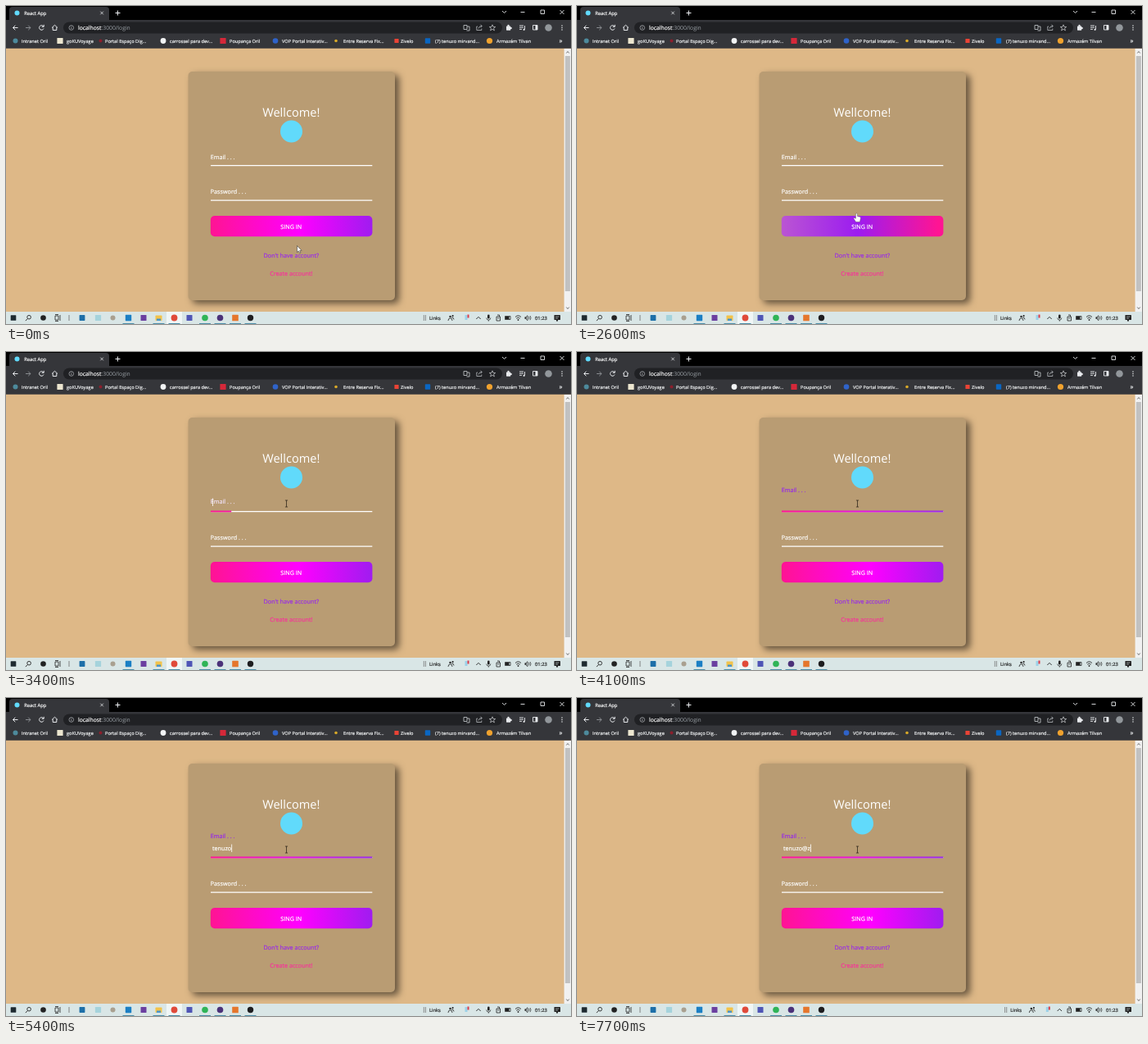
Recreate the animation shown at these times as an HTML page with a canvas. Size 690 px wide and 388 px high, loop 8 s.

```html
<!DOCTYPE html>
<html lang="en">
<head>
<meta charset="utf-8">
<title>Login</title>
<style>
  html, body { margin: 0; width: 100%; height: 100%; overflow: hidden; background: #deb887; }
  canvas, svg { position: absolute; left: 0; top: 0; width: 690px; height: 388px; }
  text {
    font-family: "Open Sans", "Noto Sans", sans-serif; font-size: 7.2px; white-space: pre;
    color: #fff; fill: currentColor; stroke: currentColor; stroke-width: .18px;
    text-rendering: geometricPrecision;
  }
  .mid text { text-anchor: middle; }
  .marks text { font-size: 5.65px; color: #f1f3f4; }
  .bar text { font-size: 5.8px; color: #1c1c1c; }
  .path { fill: #9aa0a6; stroke: none; }
</style>
</head>
<body>
<canvas id="stage" width="690" height="388"></canvas>
<svg viewBox="0 0 690 388">
  <text x="22.2" y="10.6" style="font-size:5.8px">React App</text>
  <text x="88" y="29" style="font-size:6.8px">localhost<tspan class="path">:3000/login</tspan></text>
  <g class="marks">
    <text x="19" y="44.6">Intranet Oril</text>
    <text x="74" y="44.6">goKUVoyage</text>
    <text x="121" y="44.6">Portal Espaço Dig...</text>
    <text x="200" y="44.6">carrossel para dev...</text>
    <text x="273" y="44.6">Poupança Oril</text>
    <text x="337" y="44.6">VOP Portal Interativ...</text>
    <text x="412" y="44.6">Entre Reserva Fix...</text>
    <text x="482" y="44.6">Zivelo</text>
    <text x="524" y="44.6">(7) tenuzo mirvand...</text>
    <text x="599" y="44.6">Armazém Tilvan</text>
    <text x="675.5" y="44.6" style="font-size:8px">»</text>
  </g>
  <g class="mid">
    <text x="348.3" y="135" style="font-size:14.6px;stroke:none">Wellcome!</text>
    <text x="348.3" y="271.6">SING IN</text>
    <text x="348.3" y="306.6" style="color:#9a2be8">Don't have account?</text>
    <text x="348.3" y="328.5" style="color:#f8329a">Create account!</text>
  </g>
  <text id="label" x="249.8" y="186.6">Email . . .</text>
  <text x="249.8" y="229.3">Password . . .</text>
  <text id="typed" x="252" y="186"></text>
  <rect id="caret" y="178.5" width=".8" height="9.5" fill="#fff"/>
  <g class="bar">
    <text id="links" y="382.6">Links</text>
    <text x="646" y="382.6">01:23</text>
  </g>
  <g id="cursor" stroke-linejoin="round">
    <path id="arrow" d="M0 0V8L1.9 6.3L3.2 9L4.4 8.5L3.2 5.8H5.6Z" fill="#fff" stroke="#222" stroke-width=".5"/>
    <path id="hand" d="M-1.6 -5Q-.6 -6 .4 -5V-2L3.6 -1.2Q4.6 -.8 4.4 .6L3.4 5H-1.4L-4.2 .8Q-3.8 -.7 -1.6 .8Z" fill="#fff" stroke="#444" stroke-width=".4"/>
    <path id="beam" d="M-1.6 -4H1.6M0 -4V4M-1.6 4H1.6" fill="none" stroke="#33291c" stroke-width=".8"/>
  </g>
</svg>
<script>
const LOOP = 8000, STEP = 100;
const $ = id => document.getElementById(id);
const ctx = $('stage').getContext('2d');

const KEYS = [[4600, 't'], [4700, 'e'], [4900, 'n'], [5100, 'u'], [5300, 'z'], [5400, 'o'], [6400, '@'], [7700, 'z']];
const FOCUS = 3340;
const PATH_X = [[2400, 355.5], [2500, 348], [2600, 342], [3100, 342.5]];
const PATH_Y = [[2400, 292.5], [2500, 275], [2600, 258.5], [2700, 243], [2800, 218], [2900, 199], [3000, 189], [3100, 185]];
const SHEEN = [[2400, 0], [2600, 1.5], [2650, 1.5], [3100, 0]];
const STRIP = [[0, '#ff1493'], [.55, '#ff00ff'], [1, '#a01cf0'], [1.5, '#ba55d3'], [1.97, '#9c1cf0'], [2.47, '#ff1493'], [2.5, '#ff1493']];

const mix = (a, b, k) => a + (b - a) * k;

function track(keys, t) {
  if (t <= keys[0][0]) return keys[0][1];
  for (let i = 1; i < keys.length; i++) {
    const [t0, a] = keys[i - 1], [t1, b] = keys[i];
    if (t <= t1) return mix(a, b, (t - t0) / (t1 - t0));
  }
  return keys[keys.length - 1][1];
}

// cubic-bezier(.25, .1, .25, 1)
function ease(x) {
  if (x <= 0) return 0;
  if (x >= 1) return 1;
  const curve = (p, q, s) => 3 * p * s * (1 - s) ** 2 + 3 * q * s * s * (1 - s) + s ** 3;
  let lo = 0, hi = 1;
  for (let i = 0; i < 24; i++) {
    const s = (lo + hi) / 2;
    if (curve(.25, .25, s) < x) lo = s; else hi = s;
  }
  return curve(.1, 1, lo);
}

function box(x, y, w, h, color, r = 0) {
  ctx.fillStyle = color;
  ctx.beginPath();
  ctx.roundRect(x, y, w, h, r);
  ctx.fill();
}

function dot(x, y, r, color) {
  ctx.fillStyle = color;
  ctx.beginPath();
  ctx.arc(x, y, r, 0, 7);
  ctx.fill();
}

const square = (x, y, r, color) => box(x - r, y - r, 2 * r, 2 * r, color, .6);

function line(d, color, width = 1) {
  ctx.strokeStyle = color;
  ctx.lineWidth = width;
  ctx.stroke(new Path2D(d));
}

function drawBrowser() {
  const ink = '#e8eaed';
  box(0, 0, 690, 18, '#000');
  box(4, 1, 122, 20, '#35363a', 4);
  box(0, 17, 690, 35, '#35363a');
  box(70, 19.5, 536, 14, '#202124', 7);
  dot(13.5, 8.5, 3, '#61dafb');
  line('M115.3 6.7l3.6 3.6m0-3.6l-3.6 3.6', ink, .8);
  line('M133.5 8.5h6m-3-3v6', ink, 1);
  line('M606 6l2.5 2.5l2.5-2.5M628.5 7.5h5M653 5h4.5v4.5h-4.5zM676.5 5l5 5m0-5l-5 5', ink, .9);

  line('M14.5 26.5h-6m2.8-2.8l-2.8 2.8l2.8 2.8', ink, 1);
  line('M24 26.5h6m-2.8-2.8l2.8 2.8l-2.8 2.8', '#898c90', 1);
  line('M45.8 25a2.8 2.8 0 1 0 .2 2.5M46.2 22.8v2.5h-2.5', ink, 1);
  line('M56 26.5l3.5-3.2l3.5 3.2M57.2 26v3.5h4.6v-3.5', ink, 1);
  line('M77 26.5a2.8 2.8 0 1 0 5.6 0a2.8 2.8 0 1 0-5.6 0M79.8 26v2M79.8 24.6v.8', '#b8bbbf', .7);

  line('M559 23.5h4v5h-4zM563 25h3v5h-3.5', '#b8bbbf', .9);
  line('M576 25h-1.2v4.5h6v-2M577 27.5q.5-3 4-3m-1.5-1.8l1.8 1.8l-1.8 1.8', '#b8bbbf', .8);
  line('M594 22.8l1 2.6l2.7.1l-2.1 1.7l.8 2.7l-2.4-1.6l-2.4 1.6l.8-2.7l-2.1-1.7l2.7-.1z', '#d0d2d5', .7);
  box(611, 24.5, 5.2, 5.2, ink, .6);
  dot(613.5, 24, 1.2, ink);
  dot(616.6, 27, 1.2, ink);
  line('M627 24h5m-5 2.2h5m-5 2.2h3M633.5 24v4.5', ink, .9);
  dot(632.6, 28.8, 1.1, ink);
  line('M643.5 23.5h5.5v5.5h-5.5z', ink, .9);
  box(646.5, 23.5, 2.5, 5.5, ink);
  dot(662.5, 26.5, 4.3, '#92979b');
  [24, 26.5, 29].forEach(y => dot(679, y, .75, ink));

  square(66, 42.5, 3.6, '#ece6cf');
  square(265, 42.5, 3.6, '#d62839');
  square(477, 42.5, 2.6, '#ea4335');
  square(515, 42.5, 3.2, '#0a66c2');
  dot(11.5, 42.5, 3, '#4d8a9c');
  dot(115.5, 42.5, 2, '#8b1f2c');
  dot(192, 42.5, 3.4, '#f1f3f4');
  dot(329, 42.5, 3.3, '#2f63c9');
  dot(403, 42.5, 1.8, '#d8a928');
  dot(590.5, 42.5, 3.6, '#f0a22e');
}

function drawPage(t) {
  box(0, 51.7, 690, 321.3, '#deb887');
  box(681.6, 52, 8.4, 321, '#f1f1f1');
  box(682.9, 61, 6, 287, '#c1c1c1');
  line('M684.3 57.5l1.7-2l1.7 2M684.3 367.5l1.7 2l1.7-2', '#606060', .9);

  ctx.save();
  ctx.shadowColor = 'rgba(0,0,0,.55)';
  ctx.shadowBlur = 8;
  ctx.shadowOffsetX = 5;
  ctx.shadowOffsetY = 4;
  box(222.5, 80, 252.5, 279, '#b99c73', 5);
  ctx.restore();

  dot(348.5, 153, 13.5, '#61dafb');
  box(250, 193.9, 197.3, 1.3, '#fff');
  box(250, 236.4, 197.3, 1.3, '#fff');

  const under = ctx.createLinearGradient(250, 0, 447, 0);
  under.addColorStop(0, '#ff1493');
  under.addColorStop(.5, '#e414e0');
  under.addColorStop(1, '#9a2bea');
  box(250, 193.6, 197.3 * ease((t - FOCUS) / 500), 1.8, under);

  const left = 250 - 197 * track(SHEEN, t);
  const sheen = ctx.createLinearGradient(left, 0, left + 197 * 2.5, 0);
  STRIP.forEach(([at, color]) => sheen.addColorStop(at / 2.5, color));
  box(249.8, 256, 197.6, 25.2, sheen, 5);
}

function drawTaskbar(t) {
  const ink = '#222', y = 380.5, shift = t >= 5700 ? 12.3 : 0;
  box(0, 373, 690, 15, '#d9e6e6');
  box(196, 373, 19, 15, '#f0f6f6');
  square(9, y, 3.3, '#1e2a30');
  line('M25.8 379.7a2.3 2.3 0 1 0 4.6 0a2.3 2.3 0 1 0-4.6 0M26.4 381.5l-2.6 2.6', ink, .9);
  dot(45.5, y, 3.3, ink);
  line('M60 378h4v5h-4zM66 377v7M60 376.5h4M60 384.5h4', ink, .8);
  line('M77 377v7', '#777', .9);
  square(93, y, 3.4, '#1d6fa8');
  square(112.5, y, 3.6, '#a5d3dc');
  dot(130.5, y, 3, '#a9a090');
  square(149.5, y, 3.7, '#1b7fc4');
  square(168, y, 3.5, '#6b3fa0');
  box(182.5, 377.5, 8, 6.5, '#f2c34b', .8);
  box(184, 381.5, 5, 2.5, '#4a94c9');
  dot(205.5, y, 3.9, '#e04a3a');
  square(224, y, 3.5, '#4f55b5');
  dot(243, y, 3.8, '#2fb457');
  dot(261.5, y, 3.8, '#4b3279');
  square(280, y, 3.8, '#e5762c');
  dot(298.5, y, 3.7, '#1d1d1f');
  [149.5, 186.5, 205.5, 243, 261.5, 280, 298.5].forEach(x => box(x - 7, 387, 14, 1, '#4d8ea8'));

  ctx.save();
  ctx.translate(shift, 0);
  line('M510.3 377v7M512.4 377v7', '#777', .8);
  line('M540 384q0-3 2.5-3t2.5 3M544 380q2.8-.5 3 2.5', ink, .8);
  dot(542.5, 379, 1.2, ink);
  dot(545.6, 378, 1.1, ink);
  box(560.5, 377, 3, 6, '#9bd1e8');
  box(563.5, 376.5, 2, 4, '#d83b4b');
  line('M574.3 382l2.7-2.7l2.7 2.7', ink, .9);
  ctx.restore();

  if (!shift) {
    box(588, 376.5, 2.6, 5, ink, 1.3);
    line('M586.7 380.5q.2 2.6 2.6 2.6t2.6-2.6M589.3 383v1.7', ink, .7);
  }
  line('M599 379h4.5v5h-4.5zM600 377h2.5v2M600.3 381h2', ink, .8);
  line('M609.5 378.5h6.5v4h-6.5z', ink, .8);
  box(610, 379, 4.5, 3, ink);
  line('M622 379.5q3.5-3.4 7 0M623.3 381.2q2.2-2 4.4 0', ink, .9);
  dot(625.5, 383, .9, ink);
  box(633.5, 379.4, 2, 2.4, ink);
  line('M635 379.5l2-1.8v6l-2-1.8M638.5 379q1.3 1.6 0 3.2M640 378q2 2.6 0 5.2', ink, .7);
  box(669.5, 377, 7.5, 6, ink, .6);
  line('M671 379h4.5m-4.5 2h3', '#d9e6e6', .6);
  line('M672 382.5l1 2.2l1-2.2', ink, 1);
  $('links').setAttribute('x', 517 + shift);
}

function drawField(t) {
  const k = ease((t - FOCUS) / 500);
  const label = $('label');
  label.setAttribute('y', 186.6 - 15.3 * k);
  label.style.color = `rgb(${mix(255, 150, k)},${mix(255, 38, k)},${mix(255, 235, k)})`;

  const done = KEYS.filter(([at]) => at <= t);
  const typed = $('typed'), caret = $('caret');
  typed.textContent = done.map(([, ch]) => ch).join('');
  const last = done.length ? done[done.length - 1][0] : 3400;
  const shown = t >= last && (t - last) % 1000 < 500;
  caret.setAttribute('x', 252.2 + (done.length ? typed.getComputedTextLength() : 0));
  caret.style.display = shown ? '' : 'none';
}

function drawCursor(t) {
  const x = track(PATH_X, t), y = track(PATH_Y, t);
  const kind = y < 239 ? 'beam' : y > 254 && y < 282 ? 'hand' : 'arrow';
  $('cursor').setAttribute('transform', `translate(${x} ${y})`);
  ['arrow', 'hand', 'beam'].forEach(id => $(id).style.display = id === kind ? '' : 'none');
}

function render() {
  const t = Math.floor(performance.now() % LOOP / STEP) * STEP;
  drawBrowser();
  drawPage(t);
  drawTaskbar(t);
  drawField(t);
  drawCursor(t);
  requestAnimationFrame(render);
}
render();
</script>
</body>
</html>
```
